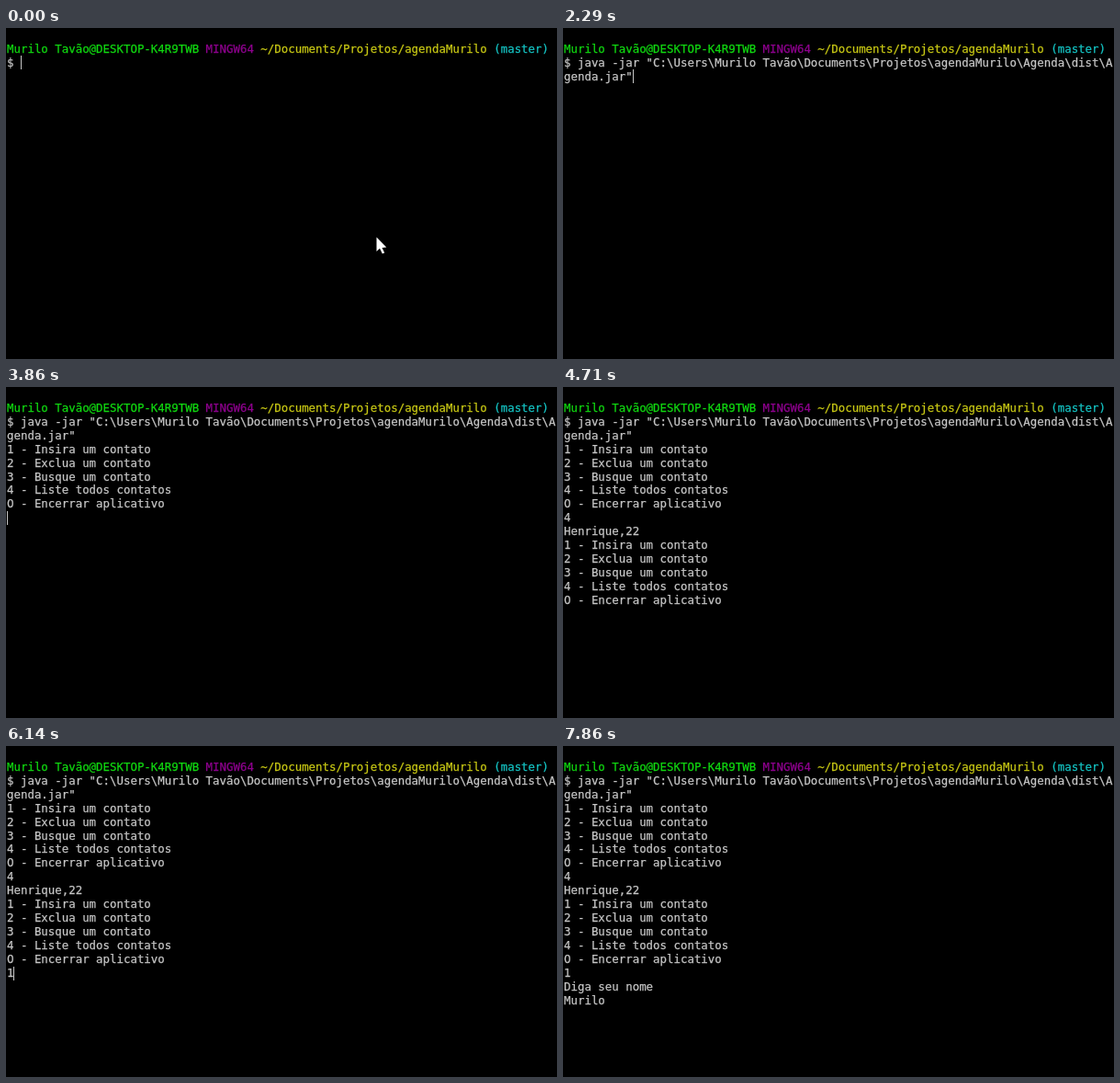
An HTML page with a canvas for the animation above (8000 ms loop, 600 by 360 pixels).

```html
<!DOCTYPE html>
<html lang="pt">
<head>
<meta charset="utf-8">
<title>Terminal</title>
<style>
  html, body { margin: 0; width: 100%; height: 100%; overflow: hidden; background: #000; }
  canvas { display: block; }
</style>
</head>
<body>
<canvas id="stage" width="600" height="360"></canvas>
<script>
const ctx = document.getElementById('stage').getContext('2d');

const LOOP = 8000, TICK = 1000 / 7;
const LEFT = 1, TOP = 15.4, COL = 7.468, ROW = 14.94, BASELINE = 11.4;
const MONO = '12.4px "DejaVu Sans Mono", monospace';
const PLAIN = '12px "DejaVu Sans", sans-serif';
const GREY = '#c6c6c6';

const PROMPT = [
  ['Murilo Tavão@DESKTOP-K4R9TWB ', '#10d810'],
  ['MINGW64 ', '#8c008c'],
  ['~/Documents/Projetos/agendaMurilo ', '#c8c814'],
  ['(master)', '#14c4c4']
];
const COMMAND = [
  '$ java -jar "C:\\Users\\Murilo Tavão\\Documents\\Projetos\\agendaMurilo\\Agenda\\dist\\A',
  'genda.jar"'
];
const MENU = [
  '1 - Insira um contato',
  '2 - Exclua um contato',
  '3 - Busque um contato',
  '4 - Liste todos contatos',
  '0 - Encerrar aplicativo'
];
const NAME = 'Murilo';
const KEY_TIMES = [6560, 6700, 6850, 6990, 7280, 7420];

// Terminal lines below the prompt; the last one holds the cursor.
function linesAt(t) {
  if (t < 1850) return ['$ '];
  const lines = [...COMMAND];
  if (t >= 2700) lines.push('');
  if (t >= 3140) lines.splice(2, 1, ...MENU, t >= 4140 ? '4' : '');
  if (t >= 4700) lines.push('Henrique,22', ...MENU, t >= 5850 ? '1' : '');
  if (t >= 6280) {
    const typed = KEY_TIMES.filter(time => t >= time).length;
    lines.push('Diga seu nome', NAME.slice(0, typed));
  }
  return lines;
}

// Pasting the command restarts the blink.
function cursorOn(t) {
  return t < 1800 ? (t + 365) % 1000 < 500 : (t - 1800) % 1011 < 505.5;
}

// A thin outline gives the strokes their terminal weight.
function drawText(text, row, color, col = 0) {
  const y = Math.round(TOP + row * ROW + BASELINE);
  ctx.fillStyle = ctx.strokeStyle = color;
  ctx.lineWidth = 0.25;
  [...text].forEach((char, i) => {
    const x = LEFT + (col + i + 0.5) * COL;
    ctx.font = char === '0' ? PLAIN : MONO;
    ctx.fillText(char, x, y);
    ctx.strokeText(char, x, y);
  });
}

function drawPointer() {
  const outline = [[0, 0], [0, 15.5], [3.5, 12.3], [6.3, 18], [8.7, 17], [6, 11.4], [10.8, 11]];
  ctx.fillStyle = '#fff';
  ctx.beginPath();
  outline.forEach(([x, y]) => ctx.lineTo(403.5 + x, 227.5 + y));
  ctx.fill();
}

function draw(t) {
  ctx.fillStyle = '#000';
  ctx.fillRect(0, 0, 600, 360);
  ctx.textAlign = 'center';

  let col = 0;
  for (const [text, color] of PROMPT) {
    drawText(text, 0, color, col);
    col += text.length;
  }

  const lines = linesAt(t);
  lines.forEach((line, i) => drawText(line, i + 1, GREY));

  if (cursorOn(t)) {
    const x = Math.round(LEFT + lines[lines.length - 1].length * COL);
    ctx.fillStyle = GREY;
    ctx.fillRect(x, Math.round(TOP + lines.length * ROW), 1, 15);
  }
  if (t < 990) drawPointer();
}

function frame() {
  const t = performance.now() % LOOP;
  draw(Math.floor((t + 4) / TICK) * TICK);
  requestAnimationFrame(frame);
}
frame();
</script>
</body>
</html>
```
